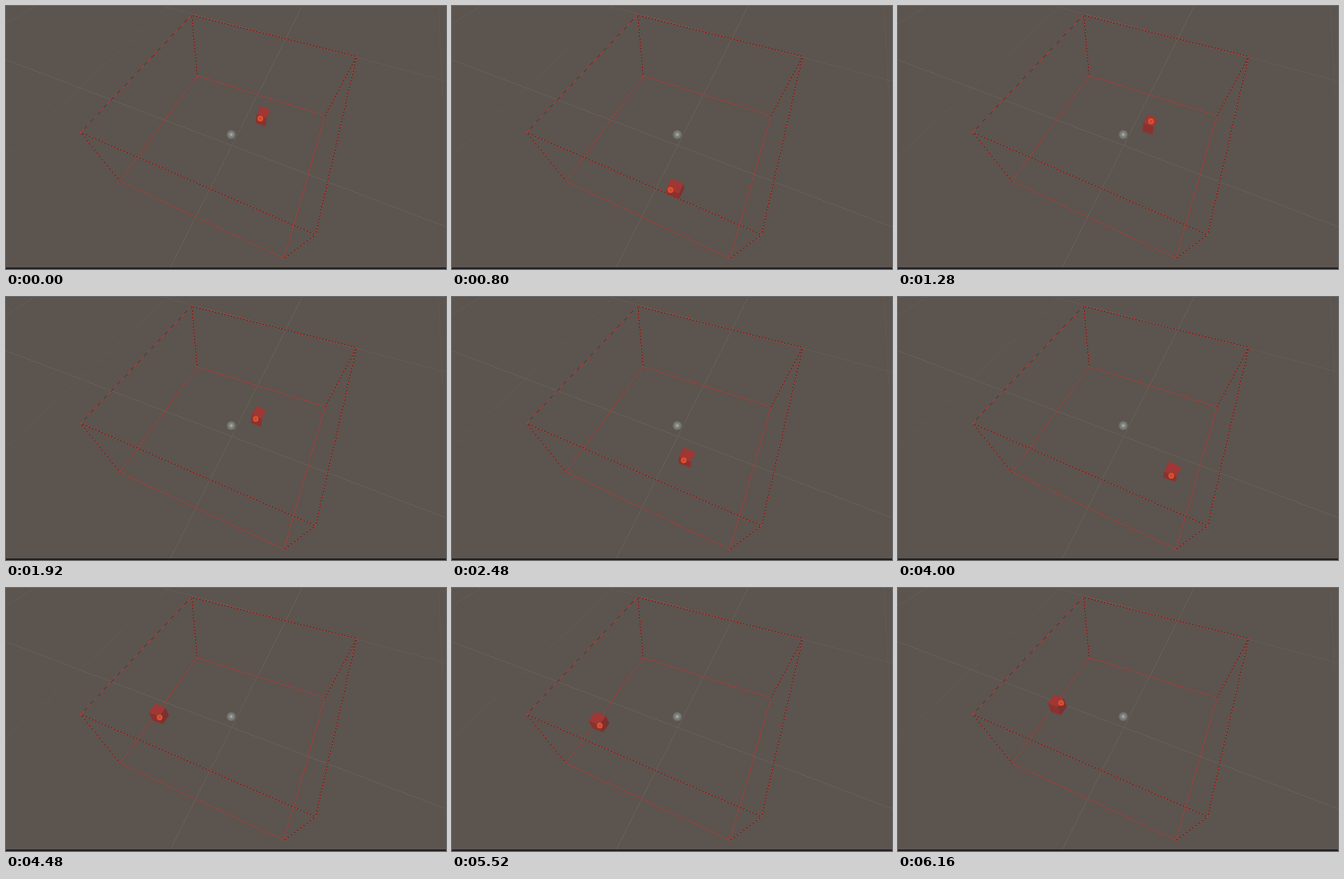
These frames come from a looping animation (558 px wide and 334 px high, 6240 ms). An HTML page with a canvas:

```html
<!DOCTYPE html>
<html>
<head>
<meta charset="utf-8">
<style>
html, body { margin: 0; width: 558px; height: 334px; overflow: hidden; background: #5c544e; }
canvas { display: block; }
</style>
</head>
<body>
<canvas id="stage" width="558" height="334"></canvas>
<script>
const ctx = document.getElementById('stage').getContext('2d');
const LOOP = 6240, STEP = 80, TURN = 320;

// The cube glides to each stop in a straight line while its marker turns.
const origin = { x: 326, y: 140, heading: -0.4 };
const legs = [
  { from: 0, to: 640, x: 283, y: 232, heading: -0.8 },
  { from: 800, to: 1520, x: 338, y: 110, heading: -3 },
  { from: 1600, to: 2320, x: 298, y: 204, heading: -0.4 },
  { from: 2880, to: 3300, x: 236, y: 177, heading: -1 },
  { from: 3440, to: 4000, x: 347, y: 222, heading: 0.2 },
  { from: 4000, to: 4080, x: 298, y: 204, heading: -1 },
  { from: 4080, to: 4480, x: 194, y: 160, heading: 0.7 },
  { from: 5440, to: 5760, x: 164, y: 201, heading: 0.7 },
  { from: 5840, to: 6160, x: 202, y: 148.5, heading: 2.6 }
];

// corners of the wire box: back left, back right, front right, front left
const topFace = [[235, 11], [444, 64], [392, 290], [94, 160]];
const baseFace = [[242, 88], [404, 139], [352, 320], [144, 222]];

const clamp01 = v => Math.min(1, Math.max(0, v));
const mix = (a, b, k) => a + (b - a) * k;

function poseAt(t) {
  let pose = origin;
  for (const leg of legs) {
    if (t < leg.from) break;
    const moved = clamp01((t - leg.from) / (leg.to - leg.from));
    const turned = clamp01((t - leg.from) / Math.min(TURN, leg.to - leg.from));
    pose = {
      x: mix(pose.x, leg.x, moved),
      y: mix(pose.y, leg.y, moved),
      heading: mix(pose.heading, leg.heading, turned)
    };
  }
  return pose;
}

// Hard-edged line whose pixels alternate between two colours.
function pixelLine(a, b, main, gap, period = 1, on = 1) {
  const n = Math.max(Math.abs(b[0] - a[0]), Math.abs(b[1] - a[1]));
  for (let i = 0; i <= n; i++) {
    ctx.fillStyle = i % period < on ? main : gap;
    ctx.fillRect(Math.round(mix(a[0], b[0], i / n)), Math.round(mix(a[1], b[1], i / n)), 1, 1);
  }
}

function disc(x, y, r, color) {
  ctx.fillStyle = color;
  ctx.beginPath();
  ctx.arc(x, y, r, 0, 7);
  ctx.fill();
}

function polygon(points, color) {
  ctx.fillStyle = color;
  ctx.beginPath();
  points.forEach(p => ctx.lineTo(...p));
  ctx.fill();
}

function drawGround() {
  const grid = (a, b, color) => pixelLine(a, b, color, color);
  ctx.fillStyle = '#5c544e';
  ctx.fillRect(0, 0, 558, 334);
  grid([0, 68], [558, 280], '#665f58');
  grid([375, 0], [207, 333], '#665f58');
  grid([0, 190], [205, 0], '#605852');
  grid([200, 0], [558, 95], '#625b55');
  grid([0, 22], [35, 0], '#625b55');
  grid([548, 0], [553, 110], '#605953');
  ctx.fillStyle = '#1f2024';
  ctx.fillRect(0, 332, 558, 2);
}

function drawBox() {
  for (let i = 0; i < 4; i++) {
    const j = (i + 1) % 4;
    pixelLine(baseFace[i], baseFace[j], '#a83d3b', '#82423e', 4, 3);
    pixelLine(topFace[i], baseFace[i], '#b93432', '#50302c', 4, 2);
    pixelLine(topFace[i], topFace[j], '#c03533', '#50302c', i === 3 ? 9 : 4, i === 3 ? 5 : 2);
  }
}

function drawSphere() {
  disc(285.7, 163.3, 5.8, '#6f6e6a');
  disc(285.7, 163.3, 4, '#7f827e');
  disc(285.7, 163.3, 1.8, '#a3a8a4');
}

function drawCube({ x, y, heading }) {
  // half edges, aimed along the vanishing points of the scene
  const width = 3 + y * 0.022;
  const right = [width, width * 0.38];
  const front = [(x - 527) * 0.012, (y + 298) * 0.012];
  const up = [(x - 288) * 0.022, (y - 385) * 0.022];
  const at = (r, f, u) => [
    x + r * right[0] + f * front[0] + u * up[0],
    y + r * right[1] + f * front[1] + u * up[1]
  ];
  const side = Math.sign(288 - x);
  polygon([at(side, -1, 1), at(side, 1, 1), at(side, 1, -1), at(side, -1, -1)], '#7d302e');
  polygon([at(-1, 1, 1), at(1, 1, 1), at(1, 1, -1), at(-1, 1, -1)], '#8c312f');
  polygon([at(-1, -1, 1), at(1, -1, 1), at(1, 1, 1), at(-1, 1, 1)], '#a03735');
  const marker = at(0.75 * Math.sin(heading), 0.75 * Math.cos(heading), 0);
  disc(...marker, 3.6, '#e9502b');
  disc(...marker, 2, '#bd4c2c');
}

const start = performance.now();
function frame() {
  const t = (performance.now() - start) % LOOP;
  drawGround();
  drawBox();
  drawSphere();
  drawCube(poseAt(Math.floor(t / STEP) * STEP));
  requestAnimationFrame(frame);
}
frame();
</script>
</body>
</html>
```
